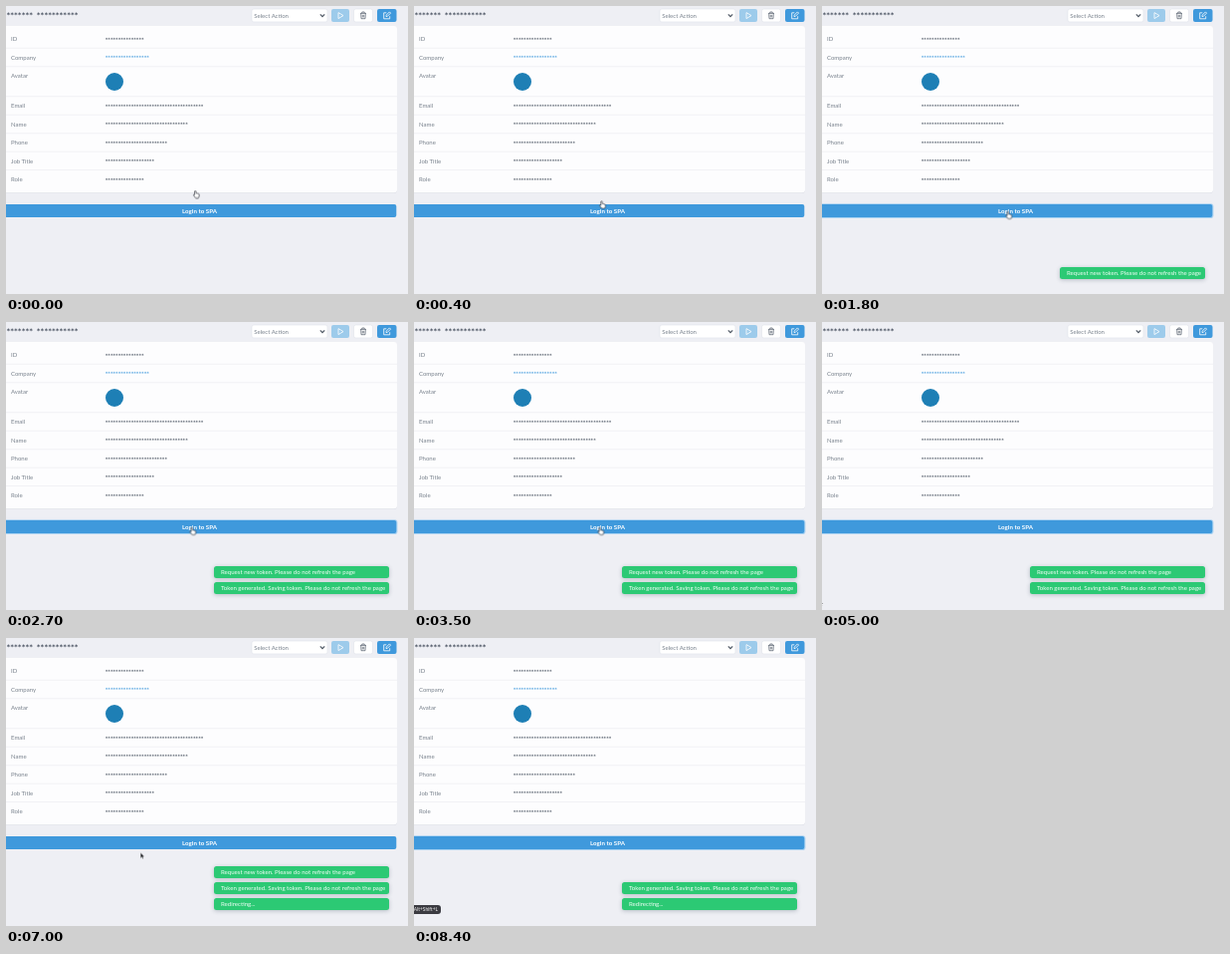
An HTML page that plays this animation: 404 px wide and 289 px high, repeating every 8.5 s.

```html
<!DOCTYPE html>
<html lang="en">
<head>
<meta charset="utf-8">
<title>Login to SPA</title>
<style>
  html, body { margin: 0; width: 100%; height: 100%; overflow: hidden; background: #eeeff4; }
  #stage { position: relative; width: 404px; height: 289px; overflow: hidden; background: #eeeff4; }
  svg { position: absolute; left: 0; top: 0; display: block; overflow: hidden; }
  text, .toast, .keys { font-family: Lato, "Open Sans", sans-serif; }
  text { font-size: 6px; fill: #78818c; }
  .stars { font: bold 4.32px "DejaVu Sans Mono", monospace; fill: #46505e; }
  .link { fill: #3f99dc; }
  .title { font-size: 6.3px; fill: #444d5c; }
  .bar { font-weight: 700; font-size: 6.2px; fill: #fff; text-anchor: middle; }

  .toast {
    position: absolute; left: 209px; width: 176px; height: 12px; padding-left: 7px;
    box-sizing: border-box; border-radius: 2.5px; background: #2cc974; color: #f3fff8;
    font-size: 6.09px; line-height: 12px; white-space: nowrap;
    box-shadow: 0 1px 4px rgba(40, 60, 80, .28); opacity: 0;
  }
  .keys {
    position: absolute; left: -6px; top: 268px; width: 33px; height: 8.5px; padding-right: 3px;
    box-sizing: border-box; border-radius: 3px; background: #3b3b41; color: #f4f4f4;
    font-size: 4.9px; line-height: 8.5px; text-align: right; white-space: nowrap; opacity: 0;
  }

  .toast, .keys, #ring { animation: 8.5s step-end infinite; }
  #ring { opacity: 0; animation-name: ring; }
  #t1 { animation-name: first; }
  #t2 { animation-name: second; }
  #t3 { top: 261px; animation-name: third; }
  .keys { animation-name: keys; }
  #hand { animation: hand 8.5s infinite; }
  #arrow { animation: arrow 8.5s linear infinite; }

  @keyframes ring {
    0% { opacity: 0; } 11.76% { opacity: 1; } 68.23% { opacity: 0; }
    85.88%, 100% { opacity: 1; }
  }
  @keyframes first {
    0% { opacity: 0; left: 239px; width: 146px; top: 261.5px; }
    20% { opacity: 1; left: 239px; width: 146px; top: 261.5px; }
    30.58% { opacity: 1; left: 209px; width: 176px; top: 245px; }
    82.35% { opacity: 1; left: 209px; width: 176px; top: 229px; }
    92.94%, 100% { opacity: 0; left: 209px; width: 176px; top: 229px; }
  }
  @keyframes second {
    0% { opacity: 0; top: 261px; }
    30.58% { opacity: 1; top: 261px; }
    82.35%, 100% { opacity: 1; top: 245px; }
  }
  @keyframes third { 0% { opacity: 0; } 82.35%, 100% { opacity: 1; } }
  @keyframes keys { 0% { opacity: 0; } 95.28%, 100% { opacity: 1; } }
  @keyframes hand {
    0% { transform: translate(188px, 184.5px); opacity: 1; animation-timing-function: ease-in-out; }
    9.4% { transform: translate(184.5px, 205.5px); opacity: 1; animation-timing-function: step-end; }
    58.82%, 100% { transform: translate(184.5px, 205.5px); opacity: 0; }
  }
  @keyframes arrow {
    0% { transform: translate(-3px, 279px); opacity: 0; animation-timing-function: step-end; }
    58.82% { transform: translate(-3px, 279px); opacity: 1; }
    63.53% { transform: translate(-3px, 279px); opacity: 1; }
    66% { transform: translate(62px, 250px); opacity: 1; }
    68.2% { transform: translate(62px, 250px); opacity: 1; animation-timing-function: ease-out; }
    72.94% { transform: translate(135px, 215.5px); opacity: 1; }
    85.8% { transform: translate(135px, 215.5px); opacity: 1; }
    88.23% { transform: translate(-8px, 212px); opacity: 1; animation-timing-function: step-end; }
    88.3%, 100% { transform: translate(-8px, 212px); opacity: 0; }
  }
</style>
</head>
<body>
<div id="stage">
  <svg width="404" height="289" viewBox="0 0 404 289">
    <text class="stars title" x="0.5" y="11.2">******* ***********</text>

    <g stroke="#dfe3e9" stroke-width=".6" fill="#fff">
      <rect x="247" y="3" width="76" height="13" rx="2"/>
      <rect x="349.5" y="3" width="19" height="13" rx="2"/>
    </g>
    <text x="249.3" y="11.6">Select Action</text>
    <path d="M315.8 8.4l2.2 2.2 2.2-2.2" fill="none" stroke="#4a5460" stroke-width="1.1"/>
    <rect x="327" y="3" width="18" height="13" rx="2" fill="#9dcbeb"/>
    <path d="M334 6.6l5 3-5 3z" fill="none" stroke="#fff" stroke-width=".8" stroke-linejoin="round"/>
    <path d="M356 7.4h6M357.8 7.2v-1.2h2.4v1.2M356.7 7.4l.3 5.3h4l.3-5.3M358.3 8.8v2.6M359.7 8.8v2.6"
      fill="none" stroke="#505a68" stroke-width=".7"/>
    <rect x="373" y="3" width="19.5" height="13" rx="2" fill="#3f99dc"/>
    <path d="M382.3 6.8h-2.6v6h6v-2.6M382 10.6l.2-1.5 3.2-3.2 1.2 1.2-3.2 3.2z"
      fill="none" stroke="#fff" stroke-width=".8" stroke-linejoin="round"/>

    <rect x="-4" y="20.6" width="397" height="167.4" rx="3" fill="#dfe1e8"/>
    <rect x="-4" y="20" width="397" height="167.2" rx="3" fill="#fdfdfe"/>
    <g id="rows"></g>
    <circle cx="109" cy="76" r="9" fill="#1e7fb5"/>

    <rect id="ring" x="-4" y="198.2" width="397.4" height="14.8" rx="2.8" fill="#a9d2f1"/>
    <rect x="-4" y="199" width="396.3" height="13" rx="2" fill="#3f99dc"/>
    <text class="bar" x="194.5" y="207.6">Login to SPA</text>
  </svg>

  <div class="toast" id="t1">Request new token. Please do not refresh the page</div>
  <div class="toast" id="t2">Token generated. Saving token. Please do not refresh the page</div>
  <div class="toast" id="t3">Redirecting...</div>
  <div class="keys">Alt+Shift+L</div>

  <svg width="404" height="289" viewBox="0 0 404 289">
    <path id="hand" d="M1.6 5V1.1q.7-.9 1.4 0V3.4q.9-.5 1.3.2.8-.3 1.1.3.8 0 .8.8V6q-.2 1.2-.7 2H2.5Q1.4 6.6.3 5.2q0-1 1.3-.2z"
      fill="#fff" stroke="#2a2e36" stroke-width=".65" stroke-linejoin="round"/>
    <path id="arrow" d="M.2 0v5.4l1.3-1.1.8 1.8 1-.4-.8-1.8h1.7z"
      fill="#15171b" stroke="#fff" stroke-width=".4" stroke-linejoin="round"/>
  </svg>
</div>
<script>
  const fields = [
    ["ID", 33, 15], ["Company", 51.6, 17], ["Avatar", 70, 0], ["Email", 100, 38],
    ["Name", 118.5, 32], ["Phone", 137, 24], ["Job Title", 155.5, 19], ["Role", 173.8, 15]
  ];
  const rows = document.getElementById("rows");

  function add(tag, attrs, content = "") {
    const node = document.createElementNS("http://www.w3.org/2000/svg", tag);
    for (const key in attrs) node.setAttribute(key, attrs[key]);
    node.textContent = content;
    rows.append(node);
  }

  fields.forEach(([label, y, count], i) => {
    if (i) add("path", { d: `M0 ${y - 9.3}H393`, stroke: "#eceef3", "stroke-width": .7 });
    add("text", { x: 5, y: y + 2.2 }, label);
    if (count) {
      const link = label === "Company" ? " link" : "";
      add("text", { x: 99.7, y: y + 1.7, class: "stars" + link }, "*".repeat(count));
    }
  });
</script>
</body>
</html>
```
